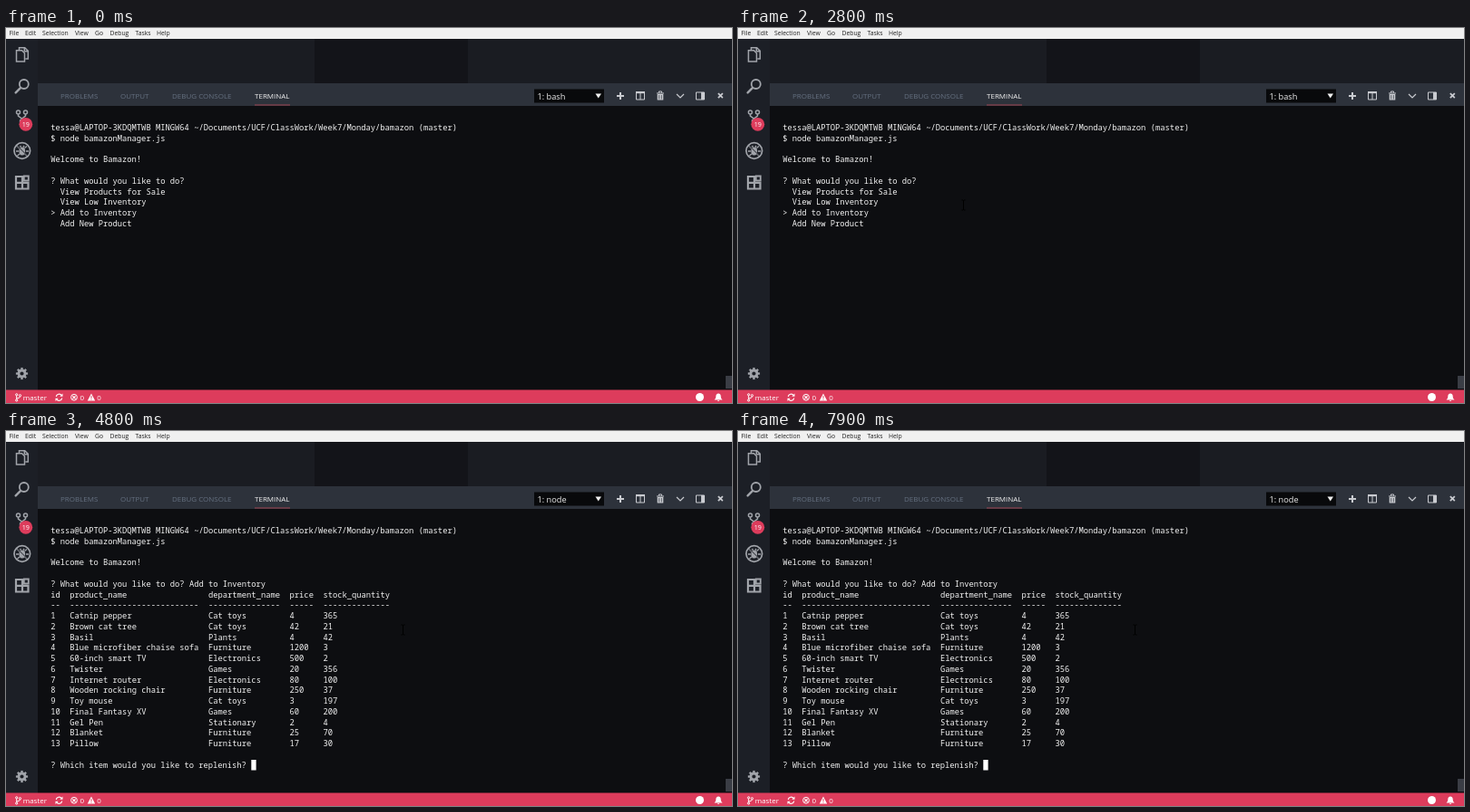
An HTML page that plays this animation: 800 px wide and 414 px high, repeating every 8000 ms.

```html
<!DOCTYPE html>
<html lang="en">
<head>
<meta charset="utf-8">
<title>Inventory terminal</title>
<style>
  html, body { margin: 0; width: 100%; height: 100%; overflow: hidden; background: #0d0e11; }
  svg { display: block; width: 100vw; height: 100vh; }
  text { white-space: pre; font-family: "Open Sans", "Noto Sans", sans-serif; }
  .mono text { font: 8.78px "Noto Sans Mono", "DejaVu Sans Mono", monospace; fill: #f4f4f4; }
  .red { fill: #dc3553; }
  .blue { fill: #427fc9; }
  .purple { fill: #8c62cc; }
  .bold { font-weight: 700; fill: #fff; }
  .line { fill: none; stroke: currentColor; }
  .solid { fill: currentColor; }
</style>
</head>
<body>
<svg viewBox="0 0 800 414" preserveAspectRatio="none">
  <rect width="800" height="414" fill="#0d0e11"/>
  <rect x="35" y="12" width="765" height="49" fill="#1a1c22"/>
  <svg x="340" y="12" width="169" height="49"><rect y="-120" width="169" height="169" fill="#131419"/></svg>
  <rect y="12" width="35" height="388" fill="#1c1f26"/>
  <rect x="35" y="61" width="765" height="25" fill="#2d323b"/>
  <rect width="800" height="12" fill="#f0f0f0"/>
  <rect y="399.5" width="800" height="14.5" fill="#dd3c5c"/>
  <rect x="793" y="384" width="7" height="14" fill="#3a3d45"/>

  <g id="menu" font-size="6.8" fill="#222"></g>
  <g id="tabs" font-size="8"></g>
  <rect x="274" y="84.5" width="39" height="1" fill="#a04552"/>

  <rect x="582" y="67.5" width="77" height="15" fill="#08090b"/>
  <text id="shell" x="585.5" y="78.7" font-size="9.2" fill="#f0f0f0"></text>
  <path d="M649.5 72.5h6.5l-3.25 5z" fill="#f0f0f0"/>

  <!-- panel actions -->
  <g color="#c9cbd0">
    <path class="line" stroke-width="2" d="M673 75h8M677 71v8"/>
    <path class="line" d="M694.5 71h9v8h-9zM699 71v8"/>
    <path class="solid" d="M694 70h10v2.2h-10z"/>
    <path class="line" d="M717 72h8M719.5 71.5v-1.5h3v1.5"/>
    <path class="solid" d="M717.7 73h6.6v6.5h-6.6z"/>
    <path stroke="#2d323b" stroke-width=".7" d="M719.7 74v4.5M722.3 74v4.5"/>
    <path class="line" stroke-width="1.2" d="M739 73l4 4l4-4"/>
    <path class="line" d="M760.5 71h9v8h-9z"/>
    <path class="solid" d="M766 71h4v8h-4z"/>
    <path class="line" stroke="#fff" stroke-width="1.8" d="M784.8 72.2l5 5M789.8 72.2l-5 5"/>
  </g>

  <!-- activity bar -->
  <g color="#a1a4aa">
    <path class="line" stroke-width="1.5" d="M14.5 24v-2.3h6.2l3.6 3.7v8.6h-3M20.3 22v3.8h3.8"/>
    <path class="line" stroke-width="1.5" d="M11.5 24.7h6l3 3v9.3h-9z"/>
    <circle class="line" stroke-width="1.8" cx="19.8" cy="62" r="5"/>
    <path class="line" stroke-width="2.5" stroke-linecap="round" d="M15.7 66.4l-5 5"/>
    <g class="line" stroke-width="1.5">
      <circle cx="13.5" cy="93" r="2"/><circle cx="21.5" cy="93" r="2"/><circle cx="17.5" cy="103" r="2"/>
      <path d="M13.5 95v2l4 3l4-3v-2M17.5 100v2"/>
    </g>
    <g class="line" stroke-width="1.4">
      <circle cx="17.8" cy="135.5" r="8.8" stroke-width="1.7"/>
      <path d="M11.5 129.5l12.5 12.5M11 136h3M22 136h3M12.5 141l2.5-2M23 130.5l-2.5 2M15.5 130l1 1.5M20 130l-1 1.5"/>
    </g>
    <ellipse class="solid" cx="17.8" cy="136" rx="3.4" ry="4.6"/>
    <path stroke="#1c1f26" d="M12.5 130l10.8 10.8"/>
    <path class="line" stroke-width="2.2" d="M11 164h7v13.5h-7zM11 170.8h13.5v6.7h-13.5"/>
    <path class="line" stroke-width="1.8" d="M19.8 163.5h5v5h-5z"/>
    <circle class="line" cx="17.5" cy="381.5" r="3.5" stroke-width="2.8"/>
    <g id="gear" class="line" stroke-width="2.3"></g>
  </g>
  <circle cx="21.8" cy="106.3" r="7.4" fill="#dd3c5c"/>
  <text x="21.8" y="109" font-size="7.2" text-anchor="middle" fill="#fff">19</text>

  <!-- status bar -->
  <g color="#fff">
    <g class="line">
      <circle cx="11.7" cy="404.8" r="1.1"/><circle cx="11.7" cy="411" r="1.1"/><circle cx="15.5" cy="405.7" r="1.1"/>
      <path d="M11.7 406v4M15.5 407q0 1.5-3.5 2"/>
      <path stroke-width="1.2" d="M55.3 407a3.3 3.3 0 0 1 6-1.4M61.7 408.5a3.3 3.3 0 0 1-6 1.4"/>
      <circle cx="75" cy="407.7" r="3.4"/>
      <path stroke-width="1.2" d="M73.4 406.1l3.2 3.2M76.6 406.1l-3.2 3.2"/>
    </g>
    <path class="solid" d="M62.5 403.5v3.2h-3.2zM54.5 412v-3.2h3.2zM94 403.5l4.2 8h-8.4z"/>
    <path stroke="#dd3c5c" d="M94 406.2v2.6M94 409.6v1"/>
    <circle class="solid" cx="764.5" cy="407.5" r="4.5"/>
    <g class="line" stroke="#dd3c5c">
      <path d="M762.8 405v1.6M766.2 405v1.6M761.8 408.5q2.7 3.2 5.4 0"/>
    </g>
    <path class="solid" d="M780.5 410.5q1.8-1.2 1.8-3.8q0-3 2.7-3.2q2.7.2 2.7 3.2q0 2.6 1.8 3.8zM783.8 411h2.4l-1.2 1.3z"/>
  </g>
  <g id="status" font-size="8" fill="#fff"></g>

  <g class="mono">
    <g id="intro"></g>
    <g id="choices"></g>
    <g id="table"></g>
  </g>
  <path id="pointer" class="line" color="#000" d="M-2 -5.5h1.5l.5 .5l.5-.5h1.5M0 -5v10M-2 5.5h1.5l.5-.5l.5 .5h1.5"/>
</svg>
<script>
const LOOP = 8000, STEP = 100;
const ANSWER_AT = 3300, POINTER_AT = 2600;
const LEFT = 49.2, BASELINE = 113, CELL = 5.268, ROW = 11.76;
const NS = "http://www.w3.org/2000/svg";
const $ = id => document.getElementById(id);

function add(parent, tag, attrs, content = "") {
  const node = document.createElementNS(NS, tag);
  for (const [key, value] of Object.entries(attrs)) node.setAttribute(key, value);
  node.textContent = content;
  parent.append(node);
  return node;
}

function labels(id, y, items) {
  for (const [x, content, fill] of items) add($(id), "text", fill ? { x, y, fill } : { x, y }, content);
}

function print(id, row, col, content, style = "") {
  add($(id), "text", { x: LEFT + col * CELL, y: BASELINE + row * ROW, class: style }, content);
}

labels("menu", 8.3, [[3.5, "File"], [21, "Edit"], [40, "Selection"], [76, "View"],
  [98, "Go"], [114.5, "Debug"], [142.5, "Tasks"], [166, "Help"]]);
labels("tabs", 77.8, [[60, "PROBLEMS", "#657080"], [126, "OUTPUT", "#657080"],
  [183, "DEBUG CONSOLE", "#657080"], [274, "TERMINAL", "#f0f0f0"]]);
labels("status", 410.7, [[18.7, "master"], [81.5, "0"], [100.3, "0"]]);

for (let angle = 0; angle < 360; angle += 45) {
  add($("gear"), "path", { d: "M17.5 377.5v-2.6", transform: `rotate(${angle} 17.5 381.5)` });
}

print("intro", 0, 0, "tessa@LAPTOP-3KDQMTWB MINGW64", "red");
print("intro", 0, 30, "~/Documents/UCF/ClassWork/Week7/Monday/bamazon", "blue");
print("intro", 0, 77, "(master)", "purple");
print("intro", 1, 0, "$ node bamazonManager.js");
print("intro", 3, 0, "Welcome to Bamazon!");
print("intro", 5, 0, "?", "red");
print("intro", 5, 2, "What would you like to do?", "bold");

["View Products for Sale", "View Low Inventory", "Add to Inventory", "Add New Product"]
  .forEach((choice, i) => print("choices", 6 + i, 2, choice, i === 2 ? "purple" : ""));
print("choices", 8, 0, ">", "purple");

const columns = [[0, 2], [4, 27], [33, 15], [50, 5], [57, 14]];
const products = `Catnip pepper|Cat toys|4|365
Brown cat tree|Cat toys|42|21
Basil|Plants|4|42
Blue microfiber chaise sofa|Furniture|1200|3
60-inch smart TV|Electronics|500|2
Twister|Games|20|356
Internet router|Electronics|80|100
Wooden rocking chair|Furniture|250|37
Toy mouse|Cat toys|3|197
Final Fantasy XV|Games|60|200
Gel Pen|Stationary|2|4
Blanket|Furniture|25|70
Pillow|Furniture|17|30`.split("\n").map((line, i) => [i + 1, ...line.split("|")]);

print("table", 5, 29, "Add to Inventory", "purple");
[["id", "product_name", "department_name", "price", "stock_quantity"],
  columns.map(([, width]) => "-".repeat(width)), ...products]
  .forEach((cells, r) => cells.forEach((cell, c) => print("table", 6 + r, columns[c][0], cell)));
print("table", 22, 0, "?", "red");
print("table", 22, 2, "Which item would you like to replenish?", "bold");
add($("table"), "rect", { x: 270.3, y: 363, width: 5.3, height: 11.5, fill: "#fff" });

const show = (id, on) => $(id).setAttribute("visibility", on ? "visible" : "hidden");

function render(time) {
  const t = Math.floor((time % LOOP) / STEP) * STEP;
  const answered = t >= ANSWER_AT;
  show("choices", !answered);
  show("table", answered);
  $("shell").textContent = answered ? "1: node" : "1: bash";

  // The pointer glides right at a steady speed, then rests.
  const travel = Math.min(1, Math.max(0, (t - 2800) / 1750));
  show("pointer", t >= POINTER_AT);
  $("pointer").setAttribute("transform", `translate(${248.5 + 189 * travel} ${195.5 + 24 * travel})`);
}

const start = performance.now();
function tick() {
  render(performance.now() - start);
  requestAnimationFrame(tick);
}
tick();
</script>
</body>
</html>
```
